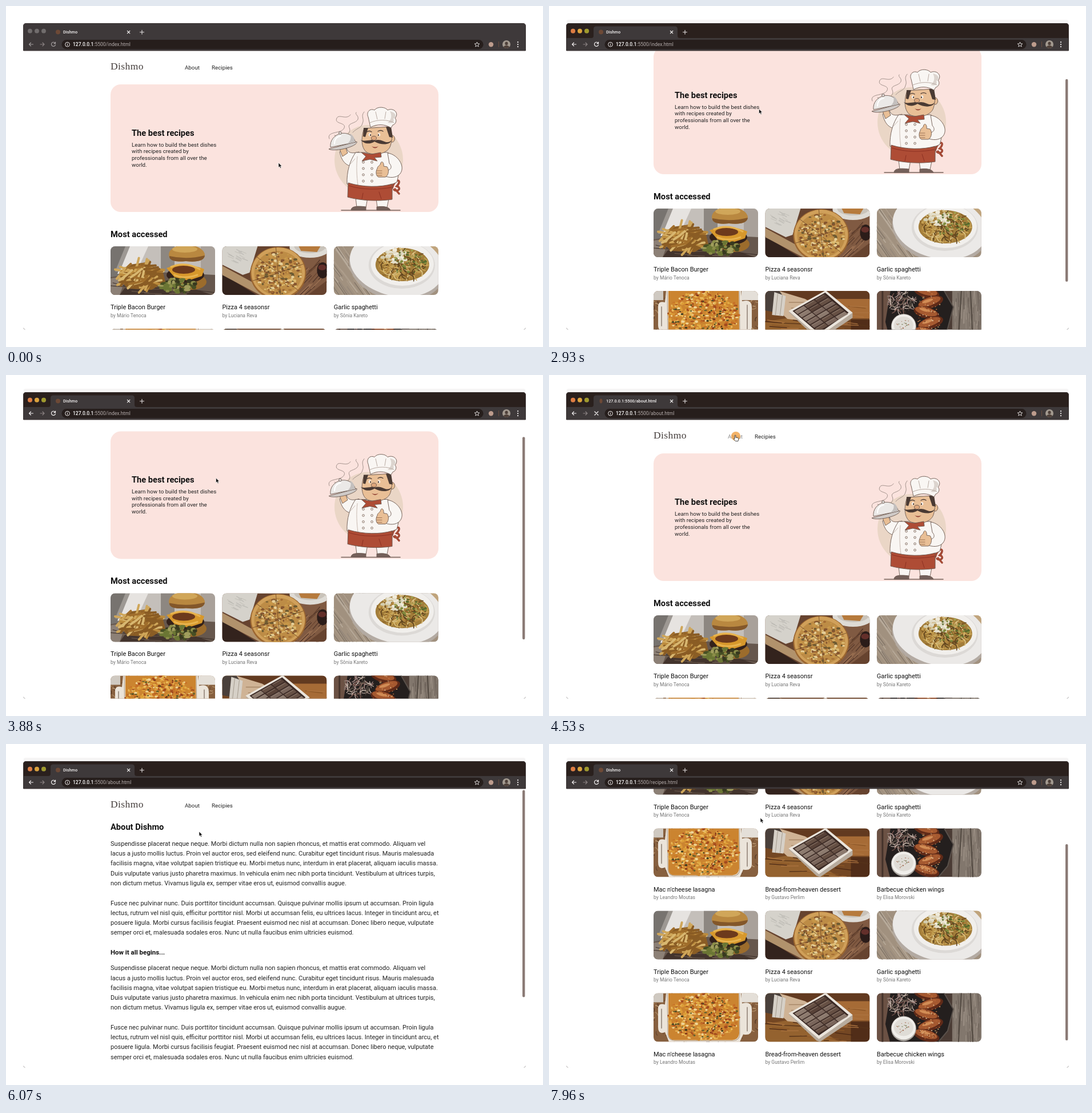
Animation of 940 by 596 pixels, one loop 8000 ms. Source, as an HTML page:

```html
<!DOCTYPE html>
<html lang="en">
<head>
<meta charset="utf-8">
<title>Recipe site tour</title>
<style>
  html, body { margin: 0; width: 100%; height: 100%; overflow: hidden; background: #fff; }
  svg { display: block; width: 940px; height: 596px; }
  text { font-family: Roboto, sans-serif; white-space: pre; }
  .logo { font-family: "Liberation Serif", serif; letter-spacing: .4px; }
  .b { font-weight: 700; }
  .m { font-weight: 500; }
</style>
</head>
<body>
<svg id="stage" viewBox="0 0 940 596"></svg>
<script>
const LOOP = 8000, BRAND = 'Dishmo';
const $ = id => document.getElementById(id);

// ---- drawing helpers -------------------------------------------------
let seed = 7;
const rnd = () => {
  seed = (seed + 0x6D2B79F5) | 0;
  let z = Math.imul(seed ^ seed >>> 15, 1 | seed);
  z = z + Math.imul(z ^ z >>> 7, 61 | z) ^ z;
  return ((z ^ z >>> 14) >>> 0) / 4294967296;
};
const pick = list => list[Math.floor(rnd() * list.length)];
const repeat = (n, fn) => Array.from({ length: n }, (_, i) => fn(i)).join('');
const rect = (x, y, w, h, fill, r = 0, more = '') =>
  `<rect x="${x}" y="${y}" width="${w}" height="${h}" rx="${r}" fill="${fill}" ${more}/>`;
const oval = (x, y, rx, ry, fill, more = '') =>
  `<ellipse cx="${x}" cy="${y}" rx="${rx}" ry="${ry}" fill="${fill}" ${more}/>`;
const path = (d, fill, more = '') => `<path d="${d}" fill="${fill}" ${more}/>`;
const line = (d, color, w = 1, more = '') =>
  path(d, 'none', `stroke="${color}" stroke-width="${w}" stroke-linecap="round" ${more}`);
const text = (x, y, s, size, fill = '#111', more = '') =>
  `<text x="${x}" y="${y}" font-size="${size}" fill="${fill}" ${more}>${s}</text>`;

// A random point in an ellipse.
const spot = (cx, cy, rx, ry) => {
  const a = rnd() * 6.283, d = Math.sqrt(rnd());
  return [cx + Math.cos(a) * d * rx, cy + Math.sin(a) * d * ry];
};
const blobs = (n, cx, cy, rx, ry, size, colors) => repeat(n, () => {
  const [x, y] = spot(cx, cy, rx, ry);
  return oval(x.toFixed(1), y.toFixed(1), (size * (.5 + rnd())).toFixed(1),
    (size * (.4 + rnd() * .6)).toFixed(1), pick(colors));
});
// Short strokes centred on random points; turn and swing give their direction.
const sticks = (n, cx, cy, rx, ry, len, w, colors, turn = 0, swing = 3.14, bend = .3) => repeat(n, () => {
  const [x, y] = spot(cx, cy, rx, ry), a = turn + (rnd() - .5) * 2 * swing;
  const dx = Math.cos(a) * len / 2, dy = Math.sin(a) * len / 2;
  return line(`M${(x - dx).toFixed(1)} ${(y - dy).toFixed(1)}Q${(x - dy * bend * 2).toFixed(1)} ${(y + dx * bend * 2).toFixed(1)} ${(x + dx).toFixed(1)} ${(y + dy).toFixed(1)}`,
    pick(colors), w);
});

// ---- food pictures, 183 x 85 each --------------------------------------
const photos = {
  burger: () => rect(0, 0, 183, 85, '#c4bfba') + rect(0, 0, 26, 54, '#77736f') +
    path('M30 0H66L44 48H12Z', '#e6e3e0') + path('M26 0H34L16 44H8Z', '#9d9893') +
    rect(88, 0, 24, 50, '#8d8781') + rect(158, 0, 25, 54, '#a9a19a') +
    path('M0 54L60 44L183 50V85H0Z', '#66574d') + path('M0 56L28 52L16 85H0Z', '#8c8076') +
    path('M16 85L30 66L110 62L178 85Z', '#43342d') +
    sticks(30, 92, 74, 90, 12, 30, 1, ['#857463', '#3a2d27', '#6f5d4f'], .1, .15, 0) +
    path('M12 54L34 32L62 28L92 46L96 62L72 76L30 74Z', '#8a5d25') +
    sticks(60, 52, 51, 36, 21, 24, 4, ['#bb8b3d', '#a06e2c', '#cfa659', '#8a5c24', '#d8b770'], -.5, .9, .05) +
    oval(142, 62, 26, 14, '#9c6c2c') + oval(131, 50, 33, 14, '#33211a') +
    path('M98 38Q132 26 164 40L160 52L136 60L112 54Z', '#d7982c') +
    oval(128, 41, 20, 7, '#6d3a1c') + line('M106 36Q130 26 156 40M112 50Q130 58 152 50', '#e8b450', 3) +
    path('M102 14C104 -8 160 -8 165 14C165 26 150 28 132 26C114 28 101 24 102 14Z', '#b98840') +
    path('M103 17Q134 24 165 16C164 26 150 28 132 26C114 28 102 25 103 17Z', '#83572a') + oval(130, 5, 22, 6, '#d0a659') +
    blobs(70, 119, 69, 32, 12, 4, ['#6b7634', '#474f24', '#8a8d48', '#38391f', '#a09d5d']),
  pizza: () => rect(0, 0, 183, 85, '#66432f') + path('M0 48L60 85H0Z', '#33231d') +
    path('M0 34L94 85H66L0 50Z', '#b1926c') + path('M0 0H62L48 46L36 50L0 32Z', '#d5d2cb') +
    sticks(14, 26, 18, 18, 11, 10, .8, ['#aaa9a4', '#bcb9b2'], .45, .1, 0) +
    path('M120 0H183V60L150 85H130Z', '#805a42') +
    sticks(24, 160, 60, 24, 28, 24, 1.2, ['#9b7152', '#503428', '#684530'], -.75, .15, 0) +
    oval(154, 2, 36, 18, '#dedbd5') + oval(154, 0, 28, 12, '#c9c3ba') + path('M134 0H172L166 10L138 8Z', '#b67a3c') +
    oval(176, 42, 10, 14, '#2b1c19') + oval(175, 37, 7, 5, '#632f2a') +
    oval(98, 47, 49, 46, '#9b6630') + oval(98, 46, 47, 44, '#d0a05a') + oval(98, 47, 42, 39, '#bd8c46') +
    blobs(260, 98, 47, 40, 37, 2.4, ['#dcba70', '#c79748', '#85552f', '#e6cf98', '#6c5a32', '#a26a33']) +
    line('M98 47L94 2M98 47L142 31M98 47L134 78M98 47L103 92M98 47L54 60M98 47L60 18', '#77502c', .9),
  pasta: () => rect(0, 0, 183, 85, '#a1917f') +
    sticks(50, 30, 46, 45, 60, 50, 1.6, ['#86796b', '#b8ab9b', '#95877a', '#aa9a88'], .95, .03, 0) +
    path('M60 0H183V30H60Z', '#d9cab4') + path('M168 0H183V30Z', '#c0a47c') +
    oval(110, 37, 84, 57, '#b3aaa2', 'transform="rotate(12 110 37)"') +
    oval(110, 32, 83, 55, '#ebe9e7', 'transform="rotate(12 110 32)"') +
    oval(119, 33, 58, 41, '#dcd9d6') + oval(120, 31, 55, 38, '#f1efec') +
    oval(120, 32, 47, 29, '#a27d3a') +
    sticks(160, 120, 32, 42, 25, 14, 1.6, ['#cba757', '#8b6227', '#b68a42', '#61451f', '#dcc384'], 0, 3.14, .5) +
    blobs(45, 107, 17, 22, 12, 3.4, ['#f0ebda', '#e3ddc8', '#d3ccae']) +
    blobs(50, 132, 28, 34, 22, 2, ['#7f8a3c', '#566a2d', '#a1a351']),
  lasagna: () => rect(0, 0, 183, 85, '#87603f') +
    sticks(170, 91, 42, 110, 50, 7, 1.2, ['#b18f68', '#65452e', '#c1a17b', '#4e3424']) +
    rect(0, 0, 17, 16, '#cfc9c1') + rect(154, 0, 29, 16, '#e4dfd8') +
    path('M22 0H153L155 18Q172 13 172 29V62Q172 75 157 72L151 85H27L20 68Q7 74 8 56V30Q7 16 20 20Z', '#ebe4da') +
    line('M164 25V66M14 28V61', '#a3968a', 2) + line('M24 0L25 70Q25 82 37 83H140Q151 82 151 70L150 0', '#b5a28c', 1.2) +
    path('M26 0H149L150 70Q149 81 138 82H37Q26 82 26 70Z', '#cb8430') +
    blobs(620, 88, 41, 62, 41, 2.3, ['#dc9c36', '#c66f27', '#eab95a', '#a34a1e', '#e3ae48', '#efd596', '#cf872d']) +
    blobs(75, 88, 40, 60, 38, 1.8, ['#4b4f27', '#66632f', '#7b3219', '#383a20']),
  dessert: () => rect(0, 0, 183, 85, '#744723') + rect(0, 0, 183, 15, '#623a20') +
    path('M90 14H183V48H130Z', '#a66b36') + path('M0 54L60 44L130 85H0Z', '#94622f') + rect(150, 50, 33, 35, '#512d18') +
    sticks(40, 92, 50, 95, 36, 30, 1.3, ['#563319', '#ad7440', '#895425', '#482614'], .08, .1, 0) +
    path('M0 0H24L70 14L92 28L66 52L39 49L26 37L0 33Z', '#cfb395') + line('M42 20L76 20M46 30L72 31', '#a78767', 1.5) +
    path('M0 0H25L35 14L25 39L0 34Z', '#4a403b') + path('M16 2L36 9L32 44L12 42Z', '#d6d0c7') + line('M22 5L18 42M30 8L26 43', '#a49a8d', 1) +
    path('M41 37L106 0L153 38V47L96 85L90 83Z', '#b7ab9d') + path('M41 35L106 -1L153 38L94 80Z', '#ebe5dc') +
    path('M48 35L105 3L146 38L94 74Z', '#3b2a25') +
    repeat(6, i => repeat(3, j => {
      const x = 51 + i * 7.2 + j * 17.7, y = 35.5 + i * 6 - j * 10.2;
      return path(`M${x} ${y}l16.6 -9.500l5.900 4.900l-16.600 9.500z`, pick(['#79655b', '#665044', '#8c7a6e', '#584238'])) +
        line(`M${x + 2.500} ${y}l13.500 -7.600`, '#a18e80', .7);
    })),
  wings: () => rect(0, 0, 183, 85, '#4b3c35') + rect(132, 0, 51, 85, '#82776d') +
    sticks(60, 158, 42, 26, 48, 24, 1.2, ['#9c9085', '#685d55', '#91867b', '#756a61'], 1.57, .07, 0) +
    line('M148 0L143 85M164 0L168 85', '#50473f', 2) + rect(0, 0, 24, 85, '#6b5144') + line('M10 0V85', '#44332b', 3) +
    path('M24 0H118L134 28L124 66L108 85H23L15 54Z', '#241f1e') + line('M118 0L134 28L124 66L108 85', '#59504a', 2) +
    sticks(75, 44, 19, 24, 19, 11, 1.2, ['#a48a85', '#cbb9ae', '#74695c', '#875f56', '#4c4038']) +
    repeat(5, i => {
      const x = 90 + (i % 2) * 7 - 3, y = 2 + i * 18, spin = `transform="rotate(${i % 2 ? -18 : 15} ${x} ${y})"`;
      return oval(x, y, 23, 10, '#5f2a18', spin) + oval(x - 1, y - 2, 20, 7, '#a55930', spin) +
        oval(x - 4, y - 4, 10, 2.6, '#d18c55', spin);
    }) +
    blobs(110, 91, 40, 22, 42, 1, ['#e9d2ab', '#dba970', '#6f3219', '#c4733c']) +
    oval(47, 62, 22, 22, '#aaa59f') + oval(47, 61, 21, 20, '#f0eeea') + oval(47, 60, 17, 15, '#dfdcd6') +
    blobs(18, 47, 60, 13, 10, 1, ['#7c8460', '#9c6045'])
};

const dishes = [
  ['burger', 'Triple Bacon Burger', 'Mário Tenoca'],
  ['pizza', 'Pizza 4 seasonsr', 'Luciana Reva'],
  ['pasta', 'Garlic spaghetti', 'Sônia Kareto'],
  ['lasagna', "Mac n'cheese lasagna", 'Leandro Moutas'],
  ['dessert', 'Bread-from-heaven dessert', 'Gustavo Perlim'],
  ['wings', 'Barbecue chicken wings', 'Elisa Morovski']
];

const cards = (top, rows) => repeat(rows * 3, i => {
  const [id, name, cook] = dishes[i % 6];
  const x = 183 + (i % 3) * 195.4, y = top + Math.floor(i / 3) * 144;
  return `<use href="#${id}" x="${x}" y="${y}"/>` + text(x, y + 110, name, 11) +
    text(x, y + 123.6, 'by ' + cook, 8.55, '#777');
});

// ---- pages -------------------------------------------------------------
const header = id => text(183, 111, BRAND, 17.5, '#443d3b', 'class="logo"') +
  text(313, 111, 'About', 9.78, '#222', `class="about-${id}"`) +
  text(360, 111, 'Recipies', 9.78, '#222', `class="recipes-${id}"`);

const footer = y => rect(30, y, 880, 60, '#ebeced') +
  text(470, y + 21.6, `All rights reserved, ${BRAND}'s recipes.`, 8.55, '#a9a9a9', 'text-anchor="middle"');

const chef = () => {
  const ink = 'stroke="#6b5850" stroke-width=".9" stroke-linejoin="round"';
  const skin = '#e9bf96', white = '#f9f6f3', red = '#ae4c35', dark = '#4a3a33';
  const bow = 'M676 318C681 299 695 303 684 315C693 317 686 327 679 321M681 320L688 328';
  return oval(635, 269, 60, 61, '#ead6c6') +
    line('M587 357H690', '#75625a', 1.5) +
    line('M566 232C560 218 588 224 592 213C596 203 574 207 579 196C583 188 596 200 603 190M575 226C588 232 606 224 601 213C597 204 612 206 616 198C618 191 610 190 613 186M607 221C614 213 622 214 624 205C628 197 620 193 627 185', '#a2918b', 1) +
    path('M612 335H633L630 352H614ZM648 337H670L667 352H650Z', white, ink) +
    path('M604 357C604 350 614 349 630 351V357ZM649 357V351C663 349 671 352 673 357Z', '#74605a', ink) +
    line(bow, '#86392a', 3.4) + line(bow, red, 2) +
    path('M618 255C604 259 598 256 596 248L584 255C588 274 598 281 610 280Z', white, ink) +
    path('M612 256C602 270 596 290 597 311C622 320 662 319 684 308C690 290 688 268 668 256Z', white, ink) +
    line('M615 263C613 280 614 298 616 313M603 276L611 267', '#c7b9b0', 1) +
    path('M599 309C625 317 655 317 676 311L676 338C650 342 620 340 598 334Z', red, ink) +
    line('M600 314C625 322 652 321 675 317M625 327L623 337M653 325L657 337', '#8c3022', 1) +
    repeat(8, i => oval(625.5 + (i % 2) * 15, 273 + Math.floor(i / 2) * 11, 1.9, 1.9, '#eee6df', 'stroke="#75635a" stroke-width=".8"')) +
    path('M668 257C685 259 700 280 690 293C683 302 669 300 663 297L664 287C674 288 677 281 671 275Z', white, ink) +
    path('M650 284C650 279 655 280 656 274C658 270 662 274 661 280L667 281C671 286 670 296 664 299H652C647 297 647 288 650 284Z', skin, ink) +
    line('M649 288H658M649 292H658M650 296H658', '#8a5d43', .8) +
    path('M585 253C584 246 592 246 595 249L598 257L589 263Z', skin, ink) +
    path('M565 250L614 237C617 245 576 256 565 250Z', '#cfcac7', ink) +
    path('M568 247C565 222 603 211 612 238Z', '#ebe9e7', ink) + oval(585, 222, 2.5, 2.2, '#e4e1df', ink) +
    path('M602 223C609 227 611 233 610 238L597 241C604 236 605 229 602 223Z', '#c3bfbd') + line('M575 241C575 232 580 228 586 227', '#fff', 2) +
    oval(676, 232, 4.5, 6, skin, ink) +
    path('M627 214C621 230 621 251 634 257C650 262 669 257 673 244C677 231 676 220 670 211Z', skin, ink) +
    path('M626 213H634L629 229L625 228ZM665 211H674L677 230L671 229Z', dark) +
    line('M632 220Q636 217 640 220M651 219Q656 216 660 219', dark, 1.3) +
    oval(637, 225, 2.2, 2.8, '#fbf6f0') + oval(653, 225, 2.2, 2.8, '#fbf6f0') +
    oval(638, 225.5, 1.1, 1.5, dark) + oval(652, 225.5, 1.1, 1.5, dark) +
    path('M645 237C637 242 627 242 620 233C623 237 632 235 638 234.500C642 233 645 233.500 646 235C650 233 656 234 660 236C666 239 672 239 675 234C673 243 658 244 645 237Z', dark) +
    oval(644, 231, 4.5, 3.6, '#dea77c', ink) + path('M640 245Q646 248 652 245Q646 252 640 245Z', '#97493a') +
    path('M622 256L640 259L656 256L657 264L645 265L650 271L637 268L623 271L630 263Z', red, ink) +
    path('M638 212L634 194C630 186 637 178 645 182C650 175 664 176 668 182C678 177 689 187 681 196C685 200 682 207 677 208L674 213C662 206 650 206 638 212Z', white, ink) +
    path('M672 184C682 186 685 193 678 197C680 203 677 206 668 204C675 199 676 191 672 184Z', '#dcd4ce') +
    line('M637 204C650 198 668 198 679 204M647 185L650 198M665 185L663 197', '#b9aba3', 1);
};

const para = [[
  'Suspendisse placerat neque neque. Morbi dictum nulla non sapien rhoncus, et mattis erat commodo. Aliquam vel',
  'lacus a justo mollis luctus. Proin vel auctor eros, sed eleifend nunc. Curabitur eget tincidunt risus. Mauris malesuada',
  'facilisis magna, vitae volutpat sapien tristique eu. Morbi metus nunc, interdum in erat placerat, aliquam iaculis massa.',
  'Duis vulputate varius justo pharetra maximus. In vehicula enim nec nibh porta tincidunt. Vestibulum at ultrices turpis,',
  'non dictum metus. Vivamus ligula ex, semper vitae eros ut, euismod convallis augue.'
], [
  'Fusce nec pulvinar nunc. Duis porttitor tincidunt accumsan. Quisque pulvinar mollis ipsum ut accumsan. Proin ligula',
  'lectus, rutrum vel nisl quis, efficitur porttitor nisl. Morbi ut accumsan felis, eu ultrices lacus. Integer in tincidunt arcu, et',
  'posuere ligula. Morbi cursus facilisis feugiat. Praesent euismod nec nisl at accumsan. Donec libero neque, vulputate',
  'semper orci et, malesuada sodales eros. Nunc ut nulla faucibus enim ultricies euismod.'
]];
const prose = (k, y) => para[k].map((s, i) => text(183, y + i * 17.1, s, 11, '#222')).join('');
const lead = ['Learn how to build the best dishes', 'with recipes created by', 'professionals from all over the', 'world.'];

const pages = {
  index: () => header('index') + rect(183, 137, 574, 223, '#fbe3de', 18) +
    text(220, 227, 'The best recipes', 14.67, '#111', 'class="b"') +
    lead.map((s, i) => text(220, 245.8 + i * 11.6, s, 9.78, '#222')).join('') +
    chef() + text(183, 403.6, 'Most accessed', 14.67, '#111', 'class="b"') + cards(420, 2) + footer(708.5),
  about: () => header('about') + text(183, 150, 'About ' + BRAND, 14.67, '#111', 'class="b"') +
    prose(0, 178.2) + prose(1, 282) +
    text(183, 367.8, 'How it all begins...', 11.44, '#111', 'class="b"') + prose(0, 395.4) + prose(1, 499.2) +
    text(183, 585, 'Ours recipes', 11.44, '#111', 'class="b"') + prose(1, 612.4) + footer(688.3),
  recipes: () => header('recipes') + cards(137, 4) + footer(727)
};

// ---- browser window ------------------------------------------------------
const frame = 'M30.500 78V35Q30.500 30.500 35 30.500H905Q909.500 30.500 909.500 35V78Z';
const chrome = () => rect(31, 24, 878, 8, '#f6f5f5', 3, 'id="shade"') +
  path(frame, '#3e393a') +
  path('M30.500 56V35Q30.500 30.500 35 30.500H905Q909.500 30.500 909.500 35V56Z', '#2a201d', 'id="strip"') +
  path('M74 56Q78 56 78 52V40Q78 35.500 83 35.500H220Q225 35.500 225 40V52Q225 56 229 56Z', '#3e393a') +
  path(frame, 'none', 'stroke="#3a3333" stroke-width="1"') +
  [42, 54, 66].map(x => oval(x, 43.7, 3.9, 3.9, '#716d6d')).join('') +
  '<g id="lights">' + ['#df7c41', '#dca23a', '#a09a2b'].map((c, i) => oval(42 + i * 12, 43.7, 3.9, 3.9, c)).join('') + '</g>' +
  oval(91, 45.5, 4, 4, '#6d4936', 'id="icon"') +
  text(100, 48.2, '', 7.33, '#f8f5f5', 'class="m" id="tab"') +
  line('M212.400 43.500l4.400 4.400m0 -4.400l-4.400 4.400', '#f0eded', 1.2) +
  line('M234.500 45.700h7m-3.500 -3.500v7', '#e6e2e2', 1.1) +
  line('M47.500 67h-7m3 -3l-3 3l3 3', '#f4f1f1', 1.1, 'id="back"') +
  line('M60 67h7m-3 -3l3 3l-3 3', '#8d8585', 1.1) +
  line('M86 64.800a3.600 3.600 0 1 0 .5 3M86.500 63v2.600h-2.600', '#f4f1f1', 1.2, 'id="reload"') +
  line('M80 64l6 6m0 -6l-6 6', '#f4f1f1', 1.3, 'id="stop"') +
  rect(97.5, 59, 738, 16.5, '#261e1c', 8.2) +
  oval(107.500, 67.200, 3.900, 3.900, 'none', 'stroke="#eeeaea" stroke-width="1"') + line('M107.500 66.800v2.200M107.500 65v.1', '#eeeaea', 1) +
  '<text x="117" y="70.300" font-size="8.55" fill="#b3abaa"><tspan fill="#fff" class="m">127.0.0.1</tspan><tspan id="url"></tspan></text>' +
  path('M824.500 63l1.200 2.900l3.100 .2l-2.400 2l.8 3l-2.700 -1.700l-2.700 1.700l.8 -3l-2.400 -2l3.100 -.2z', 'none', 'stroke="#eeeaea" stroke-width=".9"') +
  oval(849, 67.200, 4.200, 4.200, '#bd9c8d') + rect(862, 62, 1, 10, '#6b4f40') +
  '<g clip-path="url(#face)">' + rect(869, 60, 14, 14, '#a39a90') + oval(876, 65.500, 2.600, 3, '#4e4039') + oval(876, 74, 6, 5, '#4e4039') + '</g>' +
  [63.2, 67.2, 71.2].map(y => oval(896, y, 1.1, 1.1, '#f0eded')).join('');

$('stage').innerHTML = `<defs>
  <clipPath id="view"><path d="M30.500 78H909.500V561Q909.500 565.500 905 565.500H35Q30.500 565.500 30.500 561Z"/></clipPath>
  <clipPath id="round"><rect width="183" height="85" rx="8"/></clipPath>
  <clipPath id="face"><circle cx="876" cy="67" r="7"/></clipPath>
  ${Object.keys(photos).map(id => `<g id="${id}"><g clip-path="url(#round)">${photos[id]()}</g></g>`).join('')}
  </defs>` + rect(0, 0, 940, 596, '#fff') +
  line('M30.600 563q.4 2 2.400 2.400M909.400 563q-.4 2 -2.400 2.400', '#9a9696', .8) +
  `<g clip-path="url(#view)">${Object.keys(pages).map(p => `<g id="page-${p}">${pages[p]()}</g>`).join('')}</g>` +
  rect(904, 80, 4.4, 360, '#8b7b76', 2.2, 'id="thumb"') + chrome() +
  oval(327, 107, 8, 8, '#f0a043', 'id="click"') +
  `<g id="arrow">${path('M0 0V8.300L1.900 6.600L3.200 9.500L4.700 8.800L3.400 6H5.900Z', '#111', 'stroke="#fff" stroke-width=".6"')}</g>
   <g id="hand">${path('M-.9 .6Q0 -.6 .9 .6V4.200L5.300 5Q6.200 5.400 5.900 7L5 10.600H.4L-2.700 6.800Q-2.600 5.300 -.9 6.300Z', '#fff', 'stroke="#222" stroke-width=".8" stroke-linejoin="round"')}</g>`;

// ---- motion --------------------------------------------------------------
const mousePath = [
  [110, 477, 274], [280, 387, 171], [680, 387, 171], [790, 310, 127], [930, 310, 127],
  [1290, 326, 105], [1470, 326, 105], [2150, 370, 107], [2270, 370, 107], [2580, 367.5, 180],
  [4000, 367.5, 180], [4400, 326, 105], [4640, 326, 105], [4960, 338, 153], [6340, 338, 153],
  [6750, 370, 107], [7360, 370, 107], [7530, 370, 129]
];
const scrollPath = {
  index: [[2690, 0], [3280, 181], [3600, 181], [4000, 0]],
  about: [[5000, 0], [5480, 160.5], [5620, 160.5], [6020, 0]],
  recipes: [[7620, 0], [7960, 133.5]]
};
// Scrollbar length and furthest scroll of each page.
const bars = { index: [354, 181], about: [362, 160.5], recipes: [343, 199] };

const clamp = v => Math.max(0, Math.min(1, v));
const ramp = (t, a, b) => clamp((t - a) / (b - a));
const ease = k => k * k * (3 - 2 * k);
const within = (t, a, b) => t >= a && t < b;

function along(keys, t) {
  const i = keys.findIndex(k => k[0] > t);
  if (i === 0) return keys[0].slice(1);
  if (i < 0) return keys[keys.length - 1].slice(1);
  const [a, b] = [keys[i - 1], keys[i]], k = ease(ramp(t, a[0], b[0]));
  return a.slice(1).map((v, j) => v + (b[j + 1] - v) * k);
}
const set = (id, name, value) => $(id).setAttribute(name, value);
const show = (id, on) => set(id, 'visibility', on ? 'visible' : 'hidden');

function draw(t) {
  const page = t < 4615 ? 'index' : t < 7005 ? 'about' : 'recipes';
  const file = t < 4525 ? 'index' : t < 6915 ? 'about' : 'recipes';
  const loading = within(t, 4525, 4700) || within(t, 6915, 7090);
  const active = ramp(t, 110, 280);

  ['strip', 'lights', 'shade'].forEach(id => set(id, 'opacity', active));
  ['back', 'reload'].forEach(id => set(id, 'opacity', .55 + .45 * active));
  $('url').textContent = `:5500/${file}.html`;
  $('tab').textContent = loading ? `127.0.0.1:5500/${file}.html` : BRAND;
  set('icon', 'rx', loading ? 2.5 : 4);
  show('reload', !loading);
  show('stop', loading);

  const [scroll] = along(scrollPath[page], t);
  Object.keys(pages).forEach(p => show('page-' + p, p === page));
  set('page-' + page, 'transform', `translate(0 ${-scroll})`);

  const [len, max] = bars[page];
  set('thumb', 'height', len);
  set('thumb', 'y', 80.5 + scroll / max * (484 - len));
  const bar = within(t, 2750, 3530) ? 1 - ramp(t, 3360, 3500) :
    within(t, 3620, 4400) ? 1 - ramp(t, 4220, 4380) :
    within(t, 5030, 6240) || t >= 7660 ? 1 : 0;
  set('thumb', 'opacity', bar);

  const [x, y] = along(mousePath, t);
  const onNav = y > 100 && y < 114 && scroll < 1;
  const onAbout = onNav && x > 312 && x < 341, onRecipes = onNav && x > 358 && x < 398;
  document.querySelector('.about-' + page).setAttribute('fill', onAbout ? '#8a8a8a' : '#222');
  document.querySelector('.recipes-' + page).setAttribute('fill', onRecipes ? '#8a8a8a' : '#222');
  const hand = onAbout || onRecipes;
  show('hand', hand);
  show('arrow', !hand);
  set(hand ? 'hand' : 'arrow', 'transform', `translate(${x} ${y})`);

  const start = t < 6000 ? 4490 : 6880;
  set('click', 'cx', x + 1);
  set('click', 'cy', y + 2);
  set('click', 'opacity', t < start ? 0 : .8 * (1 - ramp(t, start + 130, start + 210)));
}

const t0 = performance.now();
function tick() {
  draw((performance.now() - t0) % LOOP);
  requestAnimationFrame(tick);
}
draw(0);
requestAnimationFrame(tick);
</script>
</body>
</html>
```
